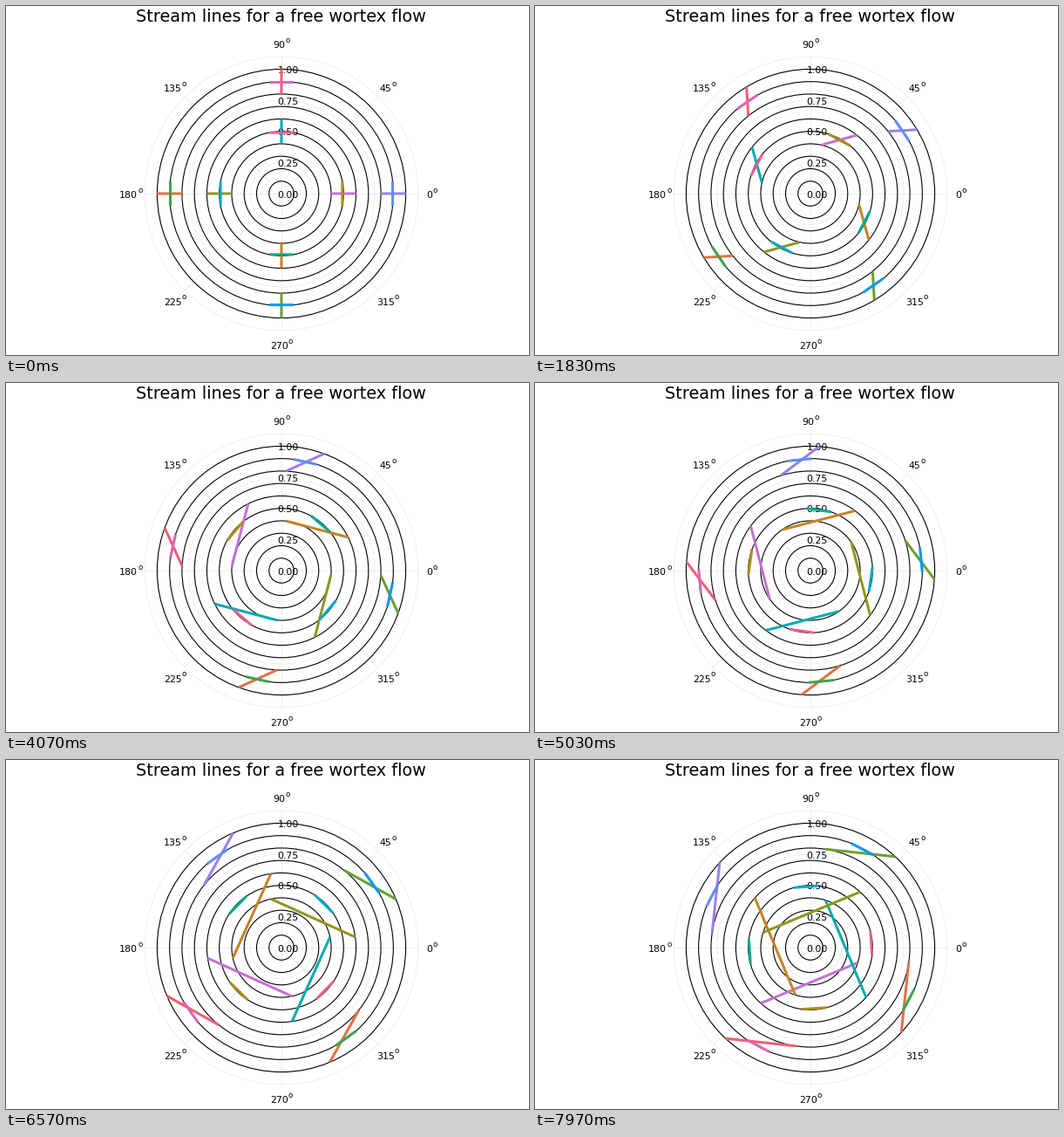
Write a matplotlib script that moves like this. It is 600 px wide and 400 px high and loops after 8000 ms.

```python
import numpy as np
import matplotlib.pyplot as plt
from matplotlib.animation import FuncAnimation
from matplotlib.collections import LineCollection
from matplotlib.patches import Circle

W, H, DPI = 600, 400, 100
FRAMES, LOOP_MS = 240, 8000
CX, CY, UNIT = 316, 215, 142.6   # centre and pixels per unit radius
RIM = 1.1
SPEED = 0.01                     # arc length travelled per frame
PX = 72 / DPI                    # points per pixel

plt.rcParams["font.family"] = "DejaVu Sans"

# (radius, half length, start angle, radial colour, tangential colour)
CROSSES = [
    (0.9, 0.1, 0, "#9b7fe9", "#618df6"),
    (0.9, 0.1, 90, "#f05f73", "#dd64b5"),
    (0.9, 0.1, 270, "#6b9e33", "#009afa"),
    (0.9, 0.1, 180, "#e36f47", "#3ea44e"),
    (0.5, 0.1, 0, "#c371d2", "#ac8e18"),
    (0.5, 0.1, 90, "#00aaae", "#ed5e93"),
    (0.5, 0.1, 270, "#c68225", "#00a98d"),
    (0.5, 0.1, 180, "#8e971e", "#00a9cc"),
]


def polar(r, a):
    return CX + UNIT * r * np.cos(a), CY - UNIT * r * np.sin(a)


def write(x, y, s, size, ha="left"):
    ax.text(x, y, s, fontsize=size * PX, ha=ha, va="baseline",
            color="black", zorder=2)


def ring(r, color, width, z):
    ax.add_patch(Circle((CX, CY), r * UNIT, fill=False, ec=color,
                        lw=width * PX, zorder=z))


def segments(n):
    """Ends of all cross arms after n steps; each end keeps its radius."""
    out = []
    for r, d, deg, *_ in CROSSES:
        a = np.radians(deg)
        arms = [[(r - d, a), (r + d, a)], [(r, a - d / r), (r, a + d / r)]]
        out += [[polar(q, b + SPEED * n / q) for q, b in arm] for arm in arms]
    return out


fig = plt.figure(figsize=(W / DPI, H / DPI), dpi=DPI, facecolor="white")
ax = fig.add_axes([0, 0, 1, 1])
ax.set_xlim(0, W)
ax.set_ylim(H, 0)
ax.axis("off")

# Faint polar grid
GRID = "#ececec"
for r in (0.25, 0.5, 0.75, 1.0, RIM):
    ring(r, GRID, 0.8, 1)
for deg in range(0, 360, 45):
    x, y = polar(RIM, np.radians(deg))
    ax.plot([CX, x], [CY, y], color=GRID, lw=0.8 * PX, zorder=1)

# Labels
write(CX - 0.5, 18, "Stream lines for a free wortex flow", 19.3, "center")
for r in np.arange(5) / 4:
    write(CX - 4.7, CY - r * UNIT + 4.5, f"{r:.2f}", 11)
for deg in range(0, 360, 45):
    x, y = polar(RIM * 1.1, np.radians(deg))
    digits = str(deg)
    join = x + (7 * len(digits) - 5.4) / 2
    write(join, y + 5.5, digits, 11, "right")
    write(join, y - 0.8, "o", 8.8)

# Stream lines
for k in range(1, 11):
    ring(k / 10, "black", 1.1, 3)

arms = LineCollection(segments(0), colors=[c for row in CROSSES for c in row[3:]],
                      linewidths=3 * PX, capstyle="butt", zorder=4)
arms.set_snap(False)
ax.add_collection(arms, autolim=False)


def update(n):
    arms.set_segments(segments(n))
    return (arms,)


anim = FuncAnimation(fig, update, frames=FRAMES, interval=LOOP_MS / FRAMES,
                     repeat=True, repeat_delay=0, blit=False)
plt.show()
```
